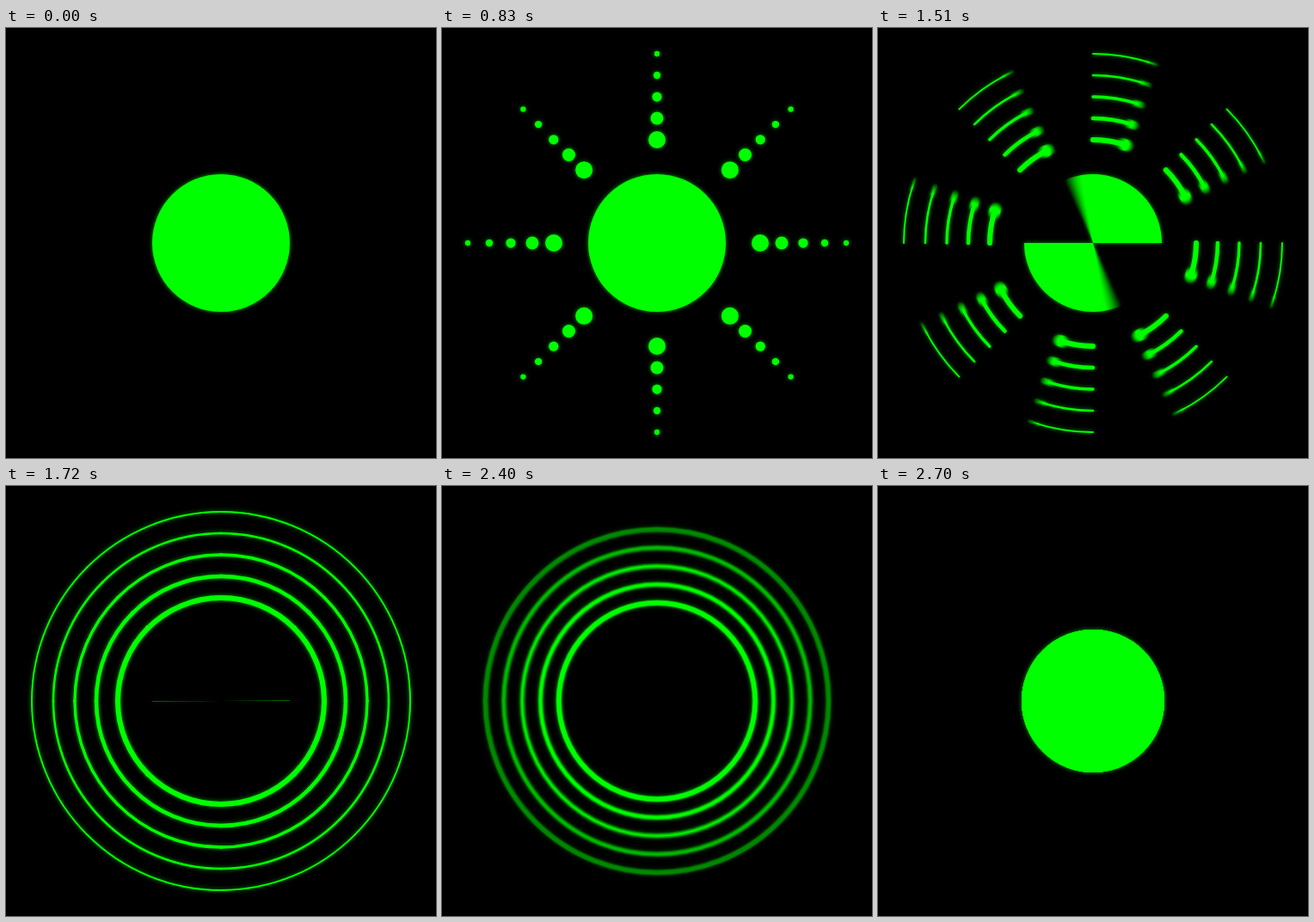
Write an HTML page with a canvas that moves like this. It is 500 px wide and 500 px high and loops after 2730 ms.

```html
<!DOCTYPE html>
<html lang="en">
<head>
<meta charset="utf-8">
<title>Green rings</title>
<style>
html, body { margin: 0; width: 100%; height: 100%; overflow: hidden; background: #000; }
canvas { display: block; width: 500px; height: 500px; filter: drop-shadow(0 0 2.6px rgba(0, 255, 0, .6)); }
</style>
</head>
<body>
<canvas id="stage" width="500" height="500"></canvas>
<script>
const out = document.getElementById('stage').getContext('2d');
const layer = document.createElement('canvas');
layer.width = layer.height = 500;
const g = layer.getContext('2d');

const LOOP = 2730, STEP = 30, COUNT = 15, SAMPLES = 16;
const TAU = Math.PI * 2, RAD = Math.PI / 180, GREEN = '#0f0';
const DISC = 80;
const ORBITS = [0, 1, 2, 3, 4].map(i => ({
  r: 120 + 25 * i,
  dot: 10 * 0.75 ** i,
  line: 6 * 0.75 ** i,
  twist: 1.125 * i * i * RAD
}));

const clamp = t => Math.min(1, Math.max(0, t));
const mix = (a, b, p) => a + (b - a) * p;
const ease = t => t < 0.5 ? 4 * t ** 3 : 1 - 4 * (1 - t) ** 3;

function disc(x, y, r) {
  g.beginPath();
  g.arc(x, y, r, 0, TAU);
  g.fill();
}

function arc(r, from, to, width) {
  g.lineWidth = width;
  g.beginPath();
  g.arc(0, 0, r, from, to);
  g.stroke();
}

function sector(from, to) {
  g.beginPath();
  g.moveTo(0, 0);
  g.arc(0, 0, DISC, from, to);
  g.fill();
}

function eachArm(draw) {
  for (let a = 0; a < 8; a++) ORBITS.forEach(o => draw(o, a * TAU / 8));
}

// Dots spiral out from under the disc
function burst(t) {
  const p = ease(t);
  disc(0, 0, DISC);
  if (p === 0) return;
  eachArm((o, a) => {
    const r = mix(60, o.r, p), turn = a + o.twist * (1 - p);
    disc(r * Math.cos(turn), r * Math.sin(turn), o.dot);
  });
}

// Dots draw the rings while the disc is wiped away
function sweep(t) {
  const p = ease(t);
  if (p === 0) disc(0, 0, DISC);
  else if (p < 1) {
    sector(-Math.PI * (1 - p), 0);
    sector(Math.PI * p, Math.PI);
  }
  eachArm((o, a) => {
    const end = a + p * TAU / 8;
    if (p > 0) arc(o.r, a, end, o.line);
    disc(o.r * Math.cos(end), o.r * Math.sin(end), mix(o.dot, o.line / 2, p));
  });
}

// Rings close in and the disc fills again
function gather(t) {
  const p = ease(t), core = DISC * ease(clamp(2 * t - 1));
  ORBITS.forEach(o => arc(mix(o.r, DISC, p), 0, TAU, mix(o.line, 6, p)));
  if (core > 0) disc(0, 0, core);
}

// start, end, scene, first step
const TIMELINE = [
  [0, 500, burst, 0, true],
  [500, 830, burst, 5],
  [830, 1330, sweep, 0, true],
  [1330, 1750, sweep, 1],
  [1750, 2250, sweep, 15, true],
  [2250, 2730, gather, 0]
];

function render(time) {
  const [start, , scene, first, still] = TIMELINE.find(s => time < s[1]);
  const step = still ? first : first + Math.floor((time - start) / STEP);
  const n = still ? 1 : SAMPLES;
  out.globalCompositeOperation = 'lighter';
  out.globalAlpha = 1;
  out.clearRect(0, 0, 500, 500);
  out.globalAlpha = 1 / n;
  for (let i = 0; i < n; i++) {
    const shift = still ? 0 : mix(-0.25, 0.2, i / (n - 1));
    g.setTransform(1, 0, 0, 1, 0, 0);
    g.clearRect(0, 0, 500, 500);
    g.translate(250, 250);
    g.fillStyle = g.strokeStyle = GREEN;
    g.lineCap = 'round';
    scene(clamp((step + shift) / COUNT));
    out.drawImage(layer, 0, 0);
  }
}

const begin = performance.now();
function tick() {
  render((performance.now() - begin) % LOOP);
  requestAnimationFrame(tick);
}
tick();
</script>
</body>
</html>
```
